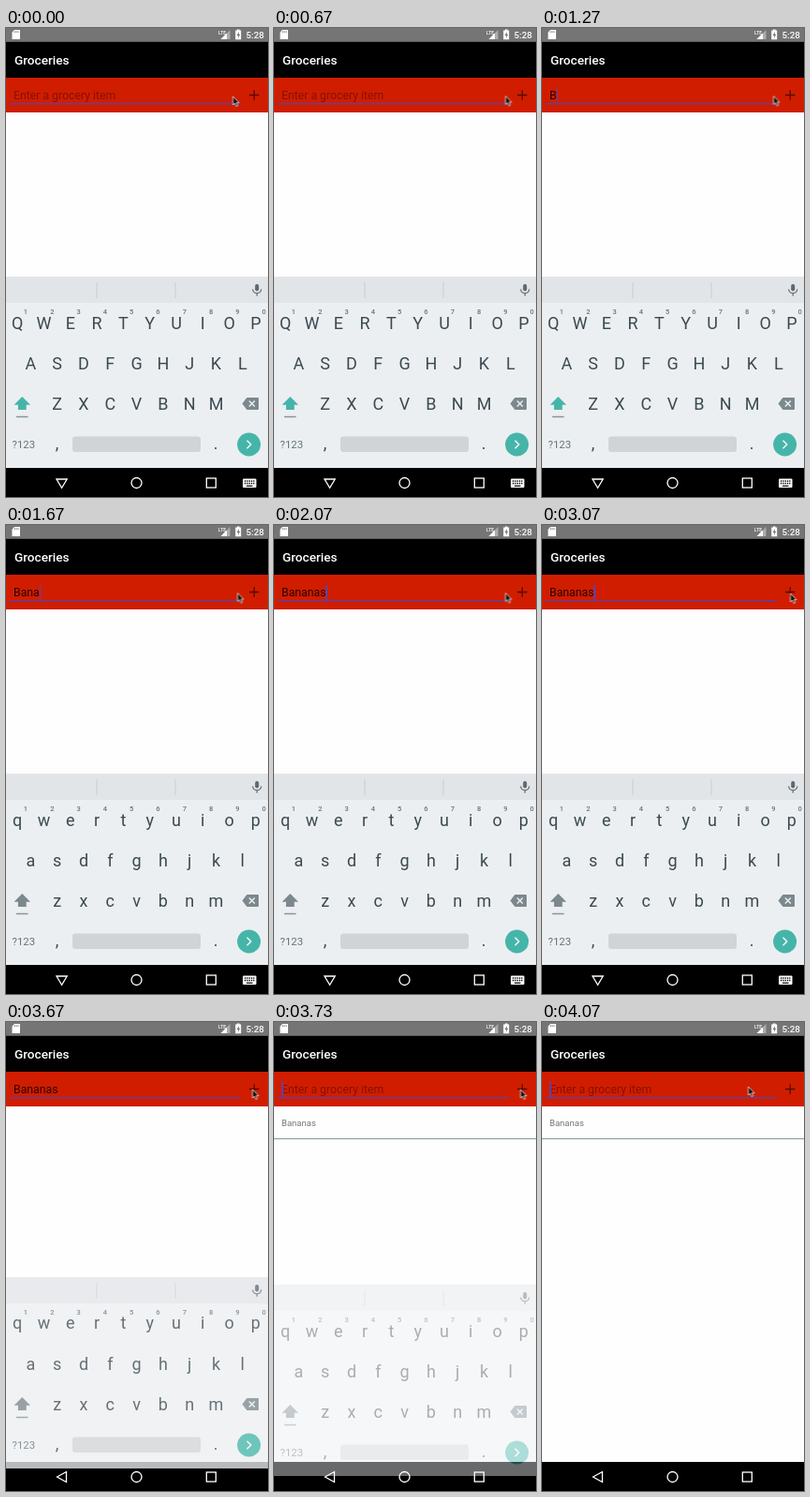
Recreate the animation shown at these times as an HTML page. Size 280 by 500 pixels, loop 4.14 s.

```html
<!DOCTYPE html>
<html lang="en">
<head>
<meta charset="utf-8">
<title>Groceries</title>
<style>
html, body { margin: 0; width: 100%; height: 100%; overflow: hidden; background: #fefeff; }
body { position: relative; font-family: Roboto, sans-serif; }
svg { position: absolute; left: 0; top: 0; display: block; }
.line { fill: none; stroke: #fff; stroke-width: 1.3; }
.medium { font-weight: 500; }
.key { font-size: 18px; fill: #3b4a51; text-anchor: middle; }
.digit { font-size: 7.5px; font-weight: 500; fill: #66757c; text-anchor: middle; }
.hint { font-size: 12.25px; fill: #861200; }

#entry {
  position: absolute; left: 8px; top: 64px; height: 16px;
  font-size: 12.25px; line-height: 16px; color: #280400; white-space: pre;
}
#entry::before { content: ""; }
#caret { position: absolute; top: 0; width: 1.5px; height: 17px; background: #5d42a6; }

/* Discrete states hold until the next keyframe; motion is linear. */
#entry::before, #caret, .empty, .upper, .lower, .open, .closed, .added {
  animation: 4140ms step-end infinite;
}
#entry::before { animation-name: type; }
#caret { animation-name: blink; }
.empty { animation-name: empty; }
.upper { animation-name: upper; }
.lower { animation-name: lower; }
.open { animation-name: open; }
.closed { animation-name: closed; }
.added { animation-name: added; }
#keyboard { animation: slide 4140ms linear infinite; }
#pointer { animation: point 4140ms linear infinite; }

@keyframes type {
  0% { content: ""; }
  30.5% { content: "B"; }
  33.6% { content: "Ba"; }
  35.3% { content: "Ban"; }
  40.1% { content: "Bana"; }
  41.6% { content: "Banan"; }
  45% { content: "Banana"; }
  46.4% { content: "Bananas"; }
  90.1%, 100% { content: ""; }
}
@keyframes blink {
  0%, 14.3%, 58%, 81.9% { visibility: hidden; }
  3%, 25.7%, 69.1%, 90.1%, 100% { visibility: visible; }
}
@keyframes empty {
  0%, 90.1%, 100% { visibility: visible; }
  30.5% { visibility: hidden; }
}
@keyframes upper {
  0% { visibility: visible; }
  31.9%, 100% { visibility: hidden; }
}
@keyframes lower {
  0% { visibility: hidden; }
  31.9%, 100% { visibility: visible; }
}
@keyframes open {
  0% { visibility: visible; }
  86.8%, 100% { visibility: hidden; }
}
@keyframes closed {
  0% { visibility: hidden; }
  86.8%, 100% { visibility: visible; }
}
@keyframes added {
  0% { visibility: hidden; }
  90.1%, 100% { visibility: visible; }
}
@keyframes slide {
  0%, 86.9% { transform: none; opacity: 1; }
  88.6% { transform: translateY(6.6px); opacity: .8; }
  90.3% { transform: translateY(16px); opacity: .4; }
  91.7%, 100% { transform: translateY(25px); opacity: 0; }
}
@keyframes point {
  0% { transform: translate(242.5px, 73px); }
  12%, 54% { transform: translate(247.5px, 72.5px); }
  59.6% { transform: translate(254px, 77px); }
  61.1% { transform: translate(263px, 81px); }
  62.8%, 69.1% { transform: translate(272px, 78px); }
  74%, 82% { transform: translate(265.5px, 73px); }
  88.5%, 92% { transform: translate(263.5px, 72px); }
  98.2%, 100% { transform: translate(220.5px, 69px); }
}
</style>
</head>
<body>
<svg width="280" height="500" viewBox="0 0 280 500">
  <rect width="280" height="500" fill="#fefeff"/>

  <!-- status bar -->
  <rect width="280" height="14.5" fill="#757575"/>
  <path d="M9 2h6v10H6.500V4.800Z" fill="#fff"/>
  <path d="M9.500 3.200v2M11.300 3.200v2M13.100 3.200v2" stroke="#757575" stroke-width=".8"/>
  <text x="227" y="6.500" font-size="5" class="medium" fill="#fff">LTE</text>
  <path d="M239.500 2v10H229.500Z" fill="#fff" fill-opacity=".4"/>
  <path d="M236 5.500V12H229.500Z" fill="#fff"/>
  <path d="M247 1.500h2.500v1h1.700v9.800h-6V2.500h1.800Z" fill="#fff"/>
  <path d="M248.800 4l-2.200 4h1.500v2.800l2.100-4h-1.400Z" fill="#757575"/>
  <text x="256.500" y="10.500" font-size="9.800" class="medium" fill="#fff">5:28</text>

  <!-- title and entry bar -->
  <rect y="14.500" width="280" height="38.500" fill="#000"/>
  <text x="9" y="38.800" font-size="13.620" class="medium" fill="#fff">Groceries</text>
  <rect y="53" width="280" height="37" fill="#d01d00"/>
  <rect x="4" y="80" width="247" height="1.500" fill="#6a3c94"/>
  <text class="hint empty" x="8" y="76.200">Enter a grocery item</text>
  <path d="M260 71.500h10.500M265.250 66.300v10.500" stroke="#570c00" stroke-width="1.300"/>

  <g class="added">
    <text x="8" y="110.800" font-size="9.530" fill="#757575">Bananas</text>
    <path d="M0 124.500H280" stroke="#84999b"/>
  </g>

  <rect y="469" width="280" height="31" fill="#000"/>

  <g id="keyboard">
    <rect y="265" width="280" height="204" fill="#eceff1"/>
    <rect y="265" width="280" height="28" fill="#e2e5e8"/>
    <rect y="469" width="280" height="31" fill="#000"/>
    <path d="M97 271v17M181 271v17" stroke="#c9cdd0"/>
    <rect x="266.200" y="273" width="4" height="7.500" rx="2" fill="#5c696f"/>
    <path d="M263.700 278.500a4.500 4.300 0 0 0 9 0M268.200 282.800v3" fill="none" stroke="#5c696f" stroke-width="1.200"/>
    <g id="digits"></g>
    <g class="upper" id="capitals"></g>
    <g class="lower" id="smalls"></g>
    <path class="upper" d="M17.300 393l8.700 8.700h-4.300v5.300h-8.800v-5.300H8.600Z" fill="#46b5a9"/>
    <path class="lower" d="M17.300 393l8.700 8.700h-4.300v5.300h-8.800v-5.300H8.600Z" fill="#7b888e"/>
    <path d="M11 414.500h12.500" stroke="#84979b" stroke-width="1.500"/>
    <path d="M257.500 394.500H269.500V406.500H257.500L253 400.500Z" fill="#7b888e" stroke="#7b888e" stroke-linejoin="round"/>
    <path d="M259.800 397.500l6 6m0-6l-6 6" stroke="#eceff1" stroke-width="1.400"/>
    <text x="6.500" y="448" font-size="11.400" fill="#65747b">?123</text>
    <text class="key" x="54.500" y="449">,</text>
    <text class="key" x="224" y="449">.</text>
    <rect x="71" y="435.500" width="137" height="16.500" rx="3" fill="#d1d4d7"/>
    <circle cx="259.600" cy="444" r="12.500" fill="#46b5a9"/>
    <path d="M257.500 439.700l4.300 4.300-4.300 4.300" class="line"/>
  </g>

  <!-- navigation bar -->
  <path class="line open" d="M54 481H65.200L59.600 490.300Z"/>
  <path class="line closed" d="M54.500 485L64.500 479.500V490.500Z"/>
  <circle class="line" cx="139.500" cy="485" r="5.500"/>
  <rect class="line" x="214.300" y="480" width="10" height="10"/>
  <g class="open">
    <rect x="253" y="480.500" width="14.500" height="9.500" rx="1" fill="#fff"/>
    <path d="M255 483h10.800M255 485.500h10.800" stroke="#000" stroke-width="1.300" stroke-dasharray="1.300 1"/>
    <path d="M257 488.200h6.500" stroke="#000" stroke-width="1.200"/>
  </g>
</svg>

<div id="entry"><span id="caret"></span></div>

<svg width="280" height="500" viewBox="0 0 280 500">
  <path id="pointer" d="M0 0V9L2 7.200 3.600 10.500 5.200 9.800 3.700 6.700H6.500Z" fill="#111" stroke="#fff" stroke-width=".7"/>
</svg>

<script>
const step = 28.3;
const rows = [
  { letters: "qwertyuiop", x: 12.2, y: 320.5 },
  { letters: "asdfghjkl", x: 26.4, y: 363.7 },
  { letters: "zxcvbnm", x: 54.7, y: 407 }
];

const label = (kind, x, y, text) =>
  `<text class="${kind}" x="${x}" y="${y}">${text}</text>`;

const labels = (kind, { letters, x, y }) =>
  [...letters].map((c, i) => label(kind, x + i * step, y, c)).join("");

const fill = (id, markup) => { document.getElementById(id).innerHTML = markup; };

fill("digits", labels("digit", { letters: "1234567890", x: 21, y: 305 }));
fill("smalls", rows.map(row => labels("key", row)).join(""));
fill("capitals", rows.map(row =>
  labels("key", { ...row, letters: row.letters.toUpperCase() })).join(""));
</script>
</body>
</html>
```
